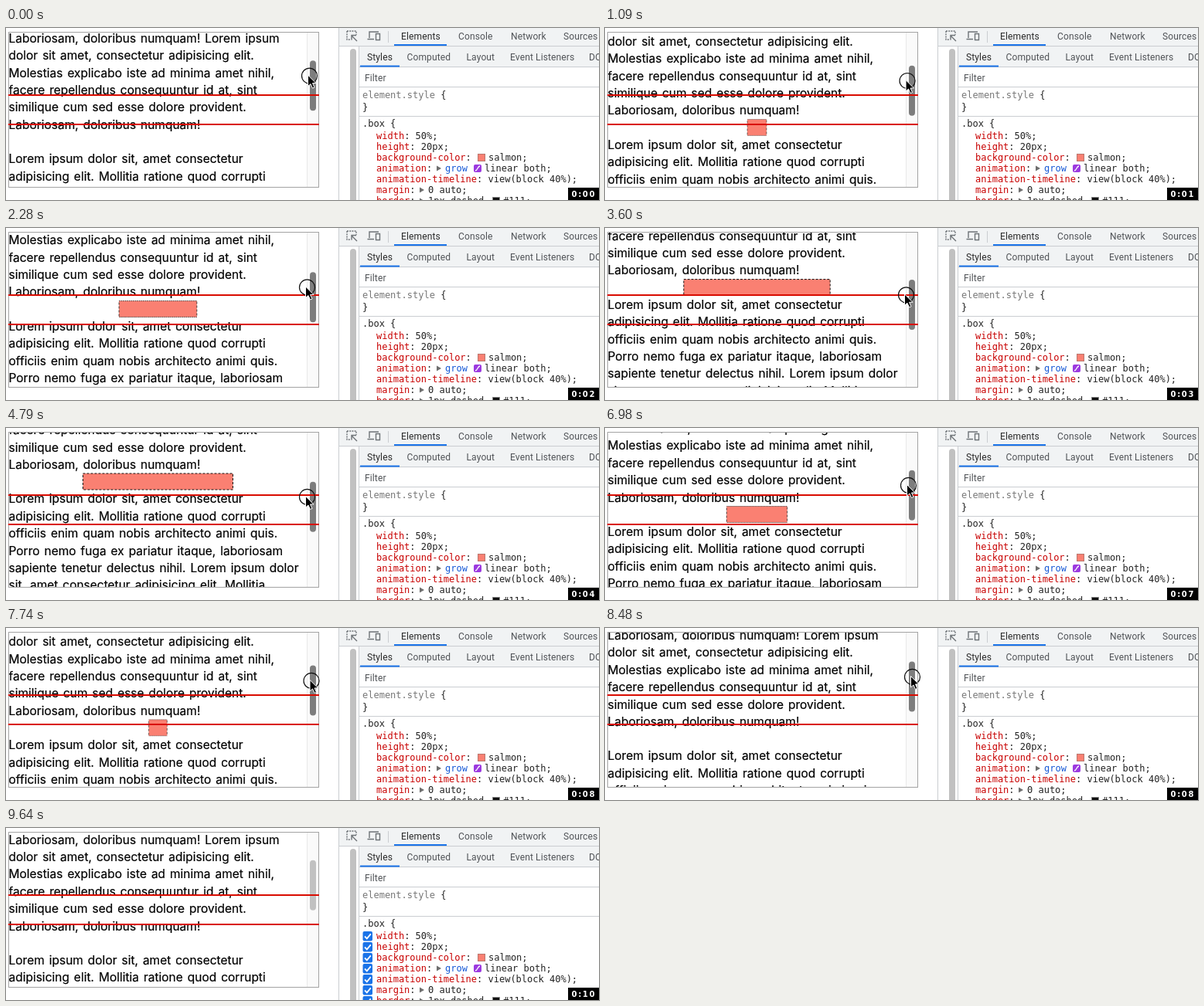
These frames come from a looping animation (767 px wide and 223 px high, 9.66 s). An HTML page:

```html
<!DOCTYPE html>
<html lang="en">
<head>
<meta charset="utf-8">
<title>View timeline</title>
<style>
html, body { margin: 0; width: 100%; height: 100%; overflow: hidden; background: #fff; }
svg { display: block; width: 767px; height: 223px; }
text { white-space: pre; }
.prose text { font: 15.5px Inter, sans-serif; word-spacing: 1.6px; fill: #000; stroke: #000; stroke-width: .2px; }
.ui { font: 12px Roboto, sans-serif; letter-spacing: .13px; fill: #505357; }
.ui .on { fill: #2a2a2a; }
.code { font: 12px "DejaVu Sans Mono", monospace; fill: #222; }
.prop { fill: #c80000; }
.clock { font: bold 10px "DejaVu Sans", sans-serif; letter-spacing: 1.7px; fill: #fff; }
.line { fill: none; stroke: #cacdd1; }
.icon { fill: none; stroke: #6e7377; stroke-width: 1.4; }
</style>
</head>
<body>
<svg viewBox="0 0 767 223">
  <clipPath id="view"><rect x="4" y="6" width="400" height="200"/></clipPath>

  <g clip-path="url(#view)">
    <g id="page" class="prose">
      <g id="box"><rect x="-97" y=".5" width="194" height="21" fill="salmon" stroke="#111" stroke-dasharray="3 2"/></g>
    </g>
    <rect x="389" y="6" width="15" height="200" fill="#fafafa"/>
    <path class="line" d="M389.5 6V206" style="stroke:#e8e8e8"/>
    <rect id="thumb" x="393" width="8" height="65" rx="4"/>
  </g>
  <rect x="3.5" y="5.5" width="401" height="201" fill="none" stroke="#a3a3a3"/>
  <path d="M3 87H405M3 125H405" stroke="#d90b00" stroke-width="2"/>

  <g class="ui">
    <path d="M431 0H767V23H431zM457 24H767V50H457z" fill="#f1f3f4"/>
    <path class="line" d="M430.5 0V223M431 23.5H767M456.5 24V223M457 50.5H767M457 76.5H767M457 114.5H767M494.5 4V19"/>
    <path d="M502 21H570V23H502zM458 48.500H509V50.500H458z" fill="#1a73e8"/>
    <rect x="445" y="27" width="8" height="210" rx="4" fill="#c1c1c1"/>
    <path class="icon" d="M441 4H453V9M441 4V15H446" stroke-dasharray="2 1.200"/>
    <path class="icon" d="M454 17L447 10M447 15.500V9.500H453"/>
    <path class="icon" d="M470 13V5H482M467.500 14.500H476M478.500 7.500H483.500V15.500H478.500z"/>
    <text class="on" x="511" y="14.500">Elements</text>
    <text x="585" y="14.500">Console</text>
    <text x="653" y="14.500">Network</text>
    <text x="721" y="14.500">Sources</text>
    <text class="on" x="467" y="42">Styles</text>
    <text x="518.500" y="42">Computed</text>
    <text x="595.500" y="42">Layout</text>
    <text x="652" y="42">Event Listeners</text>
    <text x="754" y="42">DOM Breakpoints</text>
    <text x="464" y="68.500">Filter</text>
  </g>

  <g class="code">
    <text x="461" y="91"><tspan fill="#777">element.style</tspan> {</text>
    <text x="461" y="107">}</text>
    <text x="461" y="128">.box {</text>
    <text x="479" y="144"><tspan class="prop">width</tspan>: 50%;</text>
    <text x="479" y="158"><tspan class="prop">height</tspan>: 20px;</text>
    <text x="479" y="172"><tspan class="prop">background-color</tspan>:<tspan x="624">salmon;</tspan></text>
    <text x="479" y="186"><tspan class="prop">animation</tspan>:<tspan x="568" fill="#1558d6">grow</tspan><tspan x="619">linear both;</tspan></text>
    <text x="479" y="200"><tspan class="prop">animation-timeline</tspan>: view(block 40%);</text>
    <text x="479" y="214"><tspan class="prop">margin</tspan>:<tspan x="546">0 auto;</tspan></text>
    <text x="479" y="228"><tspan class="prop">border</tspan>:<tspan x="546">1px dashed</tspan><tspan x="643">#111;</tspan></text>
    <path d="M557 178.500L563 182L557 185.500zM535 206.500L541 210L535 213.500zM535 220.500L541 224L535 227.500z" fill="#6e6e6e"/>
    <rect x="610.500" y="163.500" width="9" height="9" fill="salmon" stroke="#b9776f"/>
    <rect x="629.500" y="219.500" width="9" height="9" fill="#111" stroke="#888"/>
    <rect x="605" y="177" width="10" height="10" rx="2" fill="#9c3ae0"/>
    <path d="M607 185C610 185 610 179 613 179" fill="none" stroke="#fff" stroke-width="1.300"/>
  </g>
  <g id="checks"></g>

  <g id="cursor">
    <circle id="ring" r="10" fill="none" stroke="#111" stroke-width="1.200"/>
    <path d="M-2-1V13.500L1.500 10.500L4 16L6.500 15L4 9.500H8.500z" fill="#000" stroke="#fff"/>
  </g>
  <rect x="727" y="207" width="40" height="16" fill="#000"/>
  <text id="clock" class="clock" x="731.500" y="218.500"></text>
</svg>
<script>
const $ = id => document.getElementById(id);
const LOOP = 9660, LINE = 22.4, BOX = 22;

const above = `Laboriosam, doloribus numquam! Lorem ipsum
dolor sit amet, consectetur adipisicing elit.
Molestias explicabo iste ad minima amet nihil,
facere repellendus consequuntur id at, sint
similique cum sed esse dolore provident.
Laboriosam, doloribus numquam!`.split("\n");
const below = `Lorem ipsum dolor sit, amet consectetur
adipisicing elit. Mollitia ratione quod corrupti
officiis enim quam nobis architecto animi quis.
Porro nemo fuga ex pariatur itaque, laboriosam
sapiente tenetur delectus nihil. Lorem ipsum dolor
sit, amet consectetur adipisicing elit. Mollitia`.split("\n");

// The page's own zero is the top edge of the box.
const addLine = (text, bottom) =>
  $("page").insertAdjacentHTML("beforeend", `<text x="3.5" y="${bottom - 5.5}">${text}</text>`);
above.forEach((s, i) => addLine(s, (i + 1 - above.length) * LINE));
below.forEach((s, i) => addLine(s, BOX + (i + 1) * LINE));

for (let y = 134; y < 223; y += 14)
  $("checks").innerHTML += `<rect x="461.5" y="${y}" width="12.500" height="12.500" rx="2" fill="#1a73e8"/>
    <path d="M464 ${y + 6.5}l2.800 2.800l5-6" fill="none" stroke="#fff" stroke-width="1.800"/>`;

// [time, box top]: a slow drag down with rests, then back up
const drag = [[0, 136.3], [730, 122], [910, 122], [1580, 107], [1730, 106.5], [2280, 94],
  [2660, 85], [2720, 84.5], [3390, 68], [3570, 68], [3600, 66], [3940, 58.5], [4090, 58],
  [4260, 56], [4690, 56], [5100, 66], [5230, 66], [5250, 67], [5430, 67], [5780, 79],
  [6360, 90], [6420, 90.5], [6980, 101], [7360, 109.5], [7390, 110], [8320, 132],
  [8480, 132.5], [8750, 138]];
const sway = [[0, 392.5], [2280, 389.5], [5250, 389.5], [5780, 390.5], [6980, 392.5], [8480, 397.5], [8750, 399]];
const RELEASE = 8750, REST = 9200, GONE = 9580;

const clamp = v => Math.max(0, Math.min(1, v));
function at(keys, t) {
  const i = keys.findIndex(k => k[0] > t);
  if (i < 0) return keys[keys.length - 1][1];
  const [t0, a] = keys[i - 1], [t1, b] = keys[i];
  return a + (b - a) * (t - t0) / (t1 - t0);
}

function draw(t) {
  const top = at(drag, t), thumb = 42 + (137 - top) / 2.84;
  $("page").setAttribute("transform", `translate(0 ${top})`);
  $("box").setAttribute("transform", `translate(196.5) scale(${clamp((125.8 - top) / 61.3)} 1)`);

  const p = clamp((t - RELEASE) / (REST - RELEASE)), leave = p * p * (3 - 2 * p);
  const x = at(sway, t) + 331 * leave, y = thumb + 19.8 + 170 * leave;
  $("cursor").setAttribute("transform", `translate(${x} ${y})`);
  $("cursor").style.display = t < GONE ? "" : "none";
  $("ring").style.display = t < RELEASE ? "" : "none";
  $("thumb").setAttribute("y", thumb);
  $("thumb").setAttribute("fill", x < 405 ? "#7d7d7d" : "#c1c1c1");
  $("checks").style.display = x > 457 && y > 117 ? "" : "none";

  $("clock").textContent = "0:" + String(Math.floor(t / 963.8)).padStart(2, "0");
}

const start = performance.now();
(function tick() {
  draw((performance.now() - start) % LOOP);
  requestAnimationFrame(tick);
})();
</script>
</body>
</html>
```
